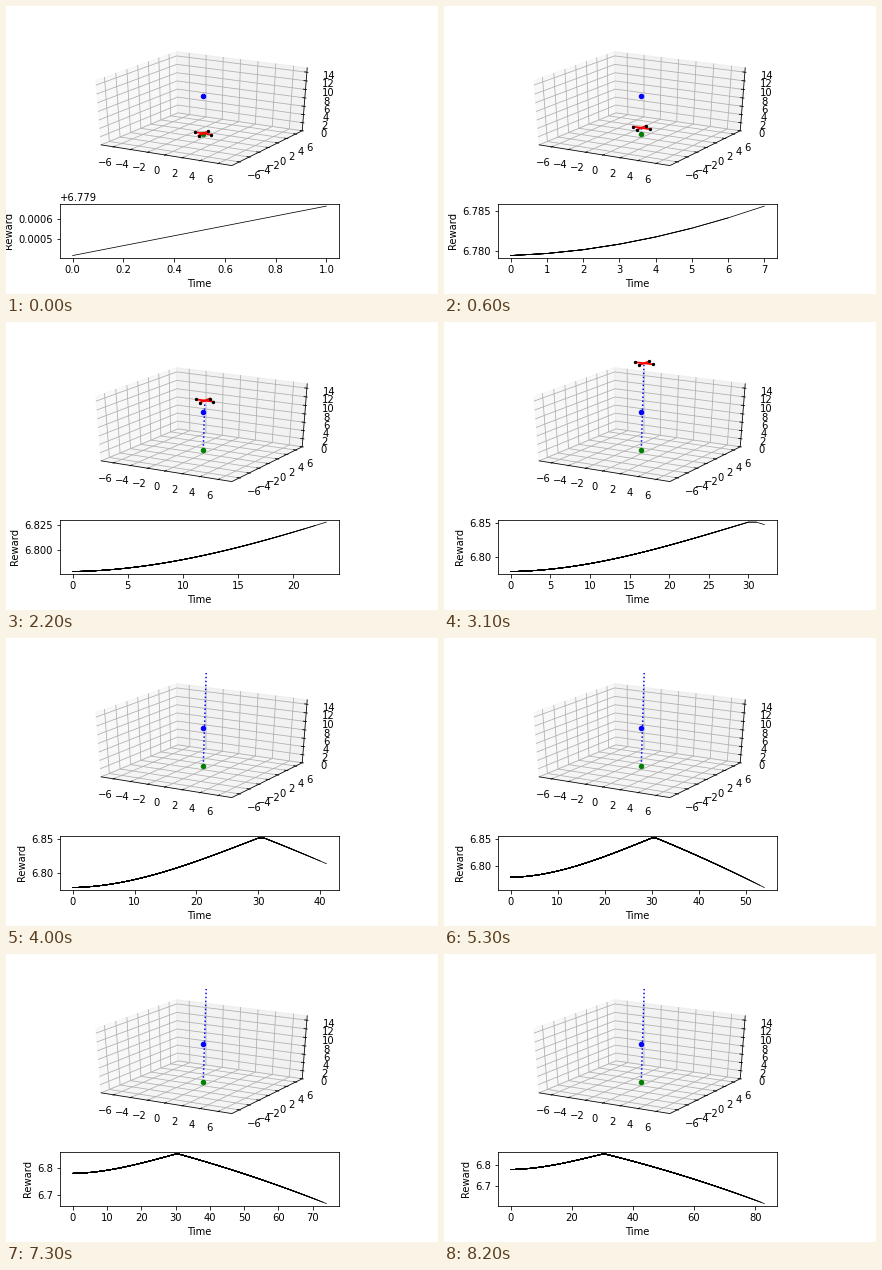
Write a matplotlib script that moves like this. It is 432x288 px and loops after 8300 ms.

```python
import numpy as np
import matplotlib.pyplot as plt
from matplotlib.animation import FuncAnimation

FRAMES, INTERVAL = 83, 100
W, H = 432, 288
SPAN = 15            # world width of each 3D axis
EDGE = 0.5           # half size of the box, in axis units
LABEL = 0.611        # distance of tick labels from the centre
ARM = 0.95

plt.rcParams.update({"font.family": "DejaVu Sans", "font.size": 10})


# --- data -----------------------------------------------------------------

def gain(t):
    return 1.39e-4 * t + 1.154e-4 * t**2 - 1.33e-6 * t**3


def reward(t):
    rise = 6.779414 + gain(t)
    s = t - 31
    fall = 6.8515 - 0.00355 * s - 1.75e-5 * s**2
    return np.where(t < 30.5, rise, fall)


def position(t):
    """World position of the drone; it stays out of view late in the flight."""
    c = gain(np.minimum(t, 45.0))
    climb = c * (228 + 310 * c)
    return 0.015 * climb, 0 * climb, 1 + climb


# --- perspective ----------------------------------------------------------

AZIM, ELEV, DIST = np.radians(-60), np.radians(30), 10
NORMAL = np.array([np.cos(AZIM) * np.cos(ELEV),
                   np.sin(AZIM) * np.cos(ELEV), np.sin(ELEV)])
RIGHT = np.array([-np.sin(AZIM), np.cos(AZIM), 0])
UP = np.cross(NORMAL, RIGHT)


def project(points):
    """Project points of the centred unit box to the view plane."""
    p = np.asarray(points, float)
    depth = DIST - p @ NORMAL
    return p @ RIGHT / depth, p @ UP / depth


def project_world(x, y, z):
    x, y, z = np.broadcast_arrays(x, y, z)
    return project(np.stack([x / SPAN, y / SPAN, z / SPAN - 0.5], axis=-1))


# --- figure ---------------------------------------------------------------

fig = plt.figure(figsize=(W / 72, H / 72), dpi=72, facecolor="white")
grid = fig.add_gridspec(8, 6, left=0.125, right=0.9, bottom=0.125, top=0.88,
                        hspace=0, wspace=0)
view = fig.add_subplot(grid[:5, :5])
view.set_xlim(-0.095, 0.09)
view.set_ylim(-0.095, 0.09)
view.axis("off")
chart = fig.add_subplot(grid[6:, :5])


def stroke(points, color, width, order):
    view.plot(*project(points), color=color, lw=width, zorder=order)


def draw_box():
    e = EDGE
    panes = [
        ([(-e, -e, -e), (-e, e, -e), (-e, e, e), (-e, -e, e)], 0.95),
        ([(-e, e, -e), (e, e, -e), (e, e, e), (-e, e, e)], 0.90),
        ([(-e, -e, -e), (e, -e, -e), (e, e, -e), (-e, e, -e)], 0.925),
    ]
    for corners, grey in panes:
        view.fill(*project(corners), color=(grey,) * 3, alpha=0.5, lw=1, zorder=0)

    def ticks(values, rule, mark, label):
        for v in values:
            u = v / SPAN
            stroke(rule(u), "#b0b0b0", 0.8, 1)
            stroke([mark(u, e + 0.1 / 12), mark(u, e - 0.2 / 12)], "black", 0.8, 2)
            x, y = project(label(u))
            view.text(x, y, str(v).replace("-", "\u2212"), ha="center", va="top")

    flat = range(-6, 7, 2)
    ticks(flat,
          lambda u: [(u, -e, -e), (u, e, -e), (u, e, e)],
          lambda u, d: (u, -d, -e),
          lambda u: (u, -LABEL, -LABEL))
    ticks(flat,
          lambda u: [(e, u, -e), (-e, u, -e), (-e, u, e)],
          lambda u, d: (d, u, -e),
          lambda u: (LABEL, u, -LABEL))
    ticks(range(0, 15, 2),
          lambda u: [(-e, -e, u - 0.5), (-e, e, u - 0.5), (e, e, u - 0.5)],
          lambda u, d: (d, e, u - 0.5),
          lambda u: (LABEL, LABEL, u - 0.5))
    stroke([(-e, -e, -e), (e, -e, -e), (e, e, -e), (e, e, e)], "black", 0.8, 2)


draw_box()
trail, = view.plot([], [], "b:", lw=1.5, zorder=3)
view.plot(*project_world(0, 0, 1), "o", color="green", ms=4.5, zorder=4)
view.plot(*project_world(0, 0, 10), "o", color="blue", ms=4.5, zorder=4)
arms = [view.plot([], [], "r-", lw=1.8, zorder=5)[0] for _ in range(2)]
rotors, = view.plot([], [], "ko", ms=2.3, zorder=6)

# Every step draws the whole curve once more, so older parts look heavier.
curves = []
for k in range(FRAMES):
    steps = np.arange(k + 2.0)
    curves += chart.plot(steps, reward(steps), "k-", lw=0.75)
chart.set_xlabel("Time")
chart.set_ylabel("Reward")


def padded(values):
    low, high = values.min(), values.max()
    pad = 0.05 * (high - low)
    return low - pad, high + pad


def update(n):
    steps = np.arange(n + 2.0)
    for k, curve in enumerate(curves):
        curve.set_visible(k <= n)
    chart.set_xlim(*padded(steps))
    chart.set_ylim(*padded(reward(steps)))

    trail.set_data(*project_world(*position(steps)))
    x, y, z = position(n + 1.0)
    ends = np.array([-ARM, ARM])
    along_x = project_world(x + ends, y, z)
    along_y = project_world(x, y + ends, z)
    arms[0].set_data(*along_x)
    arms[1].set_data(*along_y)
    rotors.set_data(*np.hstack([along_x, along_y]))
    return [trail, rotors, *arms, *curves]


anim = FuncAnimation(fig, update, frames=FRAMES, interval=INTERVAL,
                     init_func=lambda: update(0), repeat=True, repeat_delay=0)
plt.show()
```
